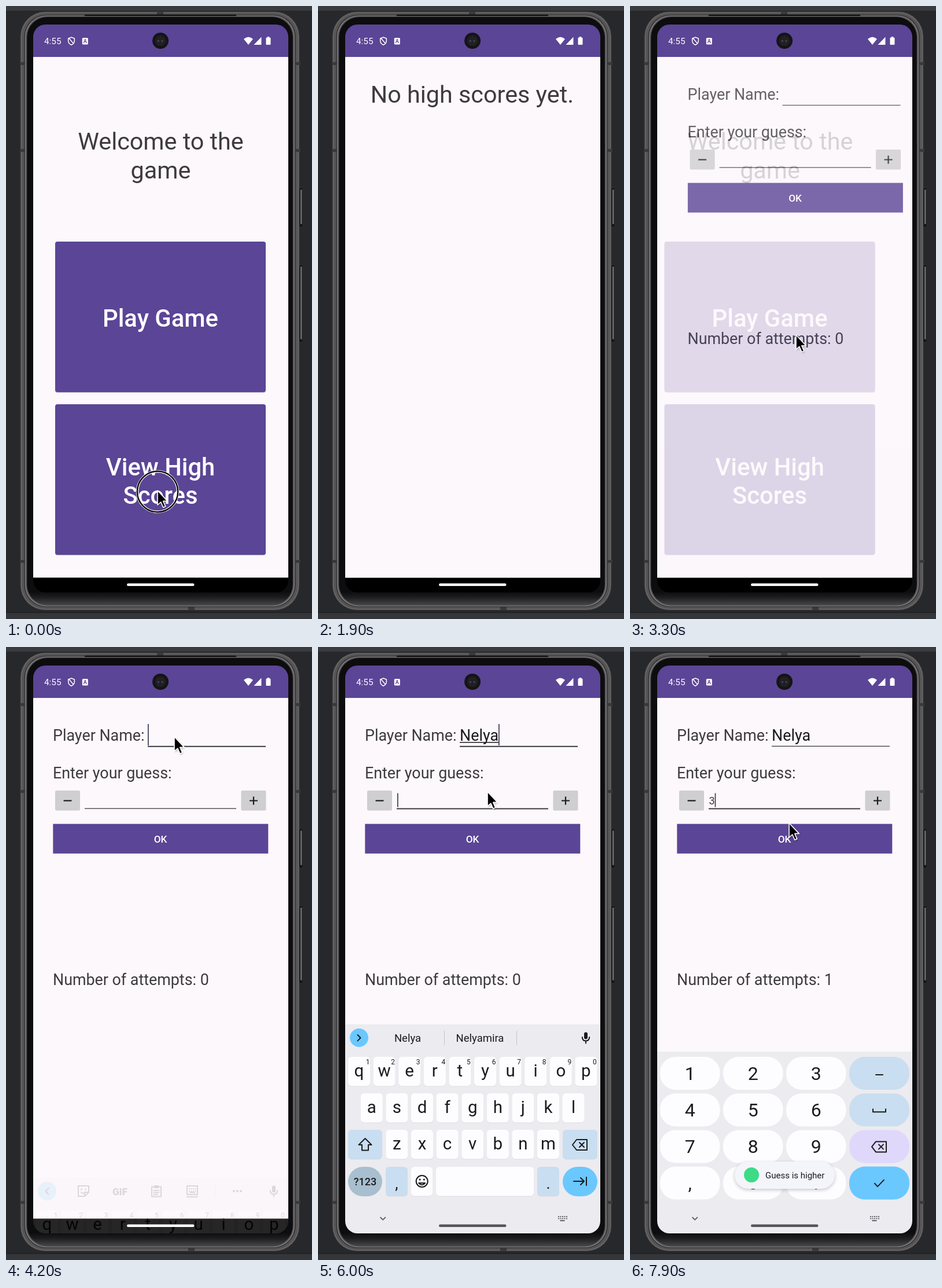
Animation of 529 by 1059 pixels, one loop 8 s. Source, as an HTML page:

```html
<!DOCTYPE html>
<html lang="en">
<head>
<meta charset="utf-8">
<title>Guessing game</title>
<style>
  html, body { margin: 0; width: 100%; height: 100%; overflow: hidden; background: #26282b; }
  svg { display: block; width: 529px; height: 1059px; font-family: Roboto, "Noto Sans", sans-serif; }
  .mid { text-anchor: middle; }
  .ink { fill: #3d3a40; }
  .key { fill: #1b1b1e; }
  .bold { font-weight: 500; }
  .line { fill: none; stroke: #1b1b1e; stroke-width: 2; stroke-linecap: round; stroke-linejoin: round; }
</style>
</head>
<body>
<svg id="stage" viewBox="0 0 529 1059"></svg>
<script>
const LOOP = 8000, STEP = 100;
const PURPLE = '#5b4596', PAPER = '#fdf8fc', SKY = '#6ac8ff', PALE = '#c9def0', CARET = '#3f3b55';
const TITLE = 41.3, LABEL = 26.85;
const NAME = 'Nelya', LONG_NAME = 'Nelyamira';

const rect = (x, y, w, h, fill, r = 0, extra = '') =>
  `<rect x="${x}" y="${y}" width="${w}" height="${h}" rx="${r}" fill="${fill}" ${extra}/>`;
const text = (x, y, size, str, cls = 'ink', extra = '') =>
  `<text x="${x}" y="${y}" font-size="${size}" class="${cls}" ${extra}>${str}</text>`;
const circle = (x, y, r, fill, extra = '') => `<circle cx="${x}" cy="${y}" r="${r}" fill="${fill}" ${extra}/>`;
const path = (d, extra = 'class="line"') => `<path d="${d}" ${extra}/>`;
const group = (id, body, extra = '') => `<g id="${id}" ${extra}>${body}</g>`;
const at = (x, y, body) => `<g transform="translate(${x} ${y})">${body}</g>`;

function phone() {
  const notch = '#39383a';
  const sides = [97, 247, 957].map(y => rect(24, y, 8, 5, notch) + rect(501, y, 8, 5, notch)).join('');
  const button = (y, h) => rect(507, y, 5, h, '#111214', 1) + rect(509, y + 2, 2.5, h - 6, '#6f6f71', 1);
  // Nested shells from the outer edge inwards
  const shell = (inset, fill, r) => rect(25 + inset, 10 + inset * .8, 482 - inset * 2, 1033.5 - inset * 1.6, fill, r);
  return rect(0, 0, 529, 1059, '#26282b') + rect(0, 0, 529, 8, '#393b3e') + rect(0, 1047, 529, 12, '#34363a') +
    rect(0, 1047, 529, 1.5, '#1d1e20') +
    button(315, 66) + button(448, 132) +
    shell(-.5, '#3c3b3d', 43) + shell(.7, '#6d6b6c', 42) + shell(2.2, '#565455', 41) + sides +
    rect(261, 9, 11, 6, notch) + rect(315, 1038, 11, 6, notch) +
    shell(6.5, '#2b2a2c', 38) + shell(7.8, '#777576', 37) + shell(9.8, '#4a484a', 36) + shell(11.3, 'url(#bezel)', 35) +
    path('M137 16H397', 'stroke="#0d0d0e" stroke-width="2.5" stroke-linecap="round"');
}

function statusBar() {
  const white = 'fill="#fff"';
  return rect(47, 32, 441, 56, PURPLE) +
    text(66, 66, 15.3, '4:55', '', white) +
    path('M113 54L118.3 56V60.5Q118 65 113 67.3Q108 65 107.7 60.5V56ZM109 56L116.5 64.5',
      'fill="none" stroke="#fff" stroke-width="1.5"') +
    rect(131.8, 55, 10, 11.5, '#fff', 1.5) +
    text(136.8, 64, 9, 'A', 'mid', `fill="${PURPLE}" font-weight="700"`) +
    path('M411 57Q419 50 427 57L419 67Z', white) + path('M428.5 67H441.5V53.5Z', white) +
    rect(449.5, 54.5, 8, 12.5, '#fff', 1.3) + rect(451.8, 53, 3.4, 2, '#fff') +
    circle(267, 60, 14, '#151416') + circle(267, 60, 9, '#222024') +
    circle(263.5, 60.5, 1.3, '#55506a') + circle(270, 60.5, 1.3, '#55506a');
}

const page = (id, body) => group(id, rect(-60, 88, 660, 899.5, PAPER) + body);

function homePage() {
  const card = (id, y) => rect(85, y + 1, 364, 260, '#2b2146', 4, 'opacity=".35"') + rect(85, y, 364, 260, PURPLE, 4) +
    rect(85, y, 364, 260, '#fff', 4, `id="${id}" opacity="0"`);
  const label = (y, str) => text(267, y, 41.7, str, 'mid bold', 'fill="#fff"');
  return page('home', text(267.5, 248, TITLE, 'Welcome to the', 'ink mid') + text(267.5, 297.5, TITLE, 'game', 'ink mid') +
    card('playGlow', 407) + card('scoresGlow', 688) +
    label(554, 'Play Game') + label(811, 'View High') + label(860, 'Scores'));
}

function gamePage() {
  const button = (x, sign) => rect(x, 248, 43, 34.5, '#cfced0', 2) +
    path(`M${x + 14.5} 265.5h14${sign}`, 'stroke="#1b1b1e" stroke-width="2.2"');
  return page('game', text(81, 161.5, LABEL, 'Player Name:') + text(81, 226.5, LABEL, 'Enter your guess:') +
    rect(245, 170.8, 204, 1, '#3d3a45', 0, 'id="nameLine"') +
    text(245, 161.5, LABEL, '', 'key', 'id="name"') + rect(245, 164, 0, 1.5, '#1b1b1e', 0, 'id="compose"') +
    rect(245, 133, 1.7, 37, CARET, 0, 'id="nameCaret"') +
    button(85, '') + button(406.5, 'm-7 -7v14') +
    rect(136, 278.4, 262, 1, '#3d3a45', 0, 'id="guessLine"') +
    text(136.5, 271.5, 18, '', 'ink', 'id="guess"') + rect(137, 252.5, 1.7, 24, CARET, 0, 'id="guessCaret"') +
    rect(81.3, 305.6, 372, 51.2, PURPLE) + text(267, 338, 17.2, 'OK', 'mid bold', 'fill="#fff"') +
    text(81, 583.5, LABEL, '', 'ink', 'id="tries"'));
}

const mic = at(463, 675, rect(-3, -9.5, 6, 12, '#1b1b1e', 3) + path('M-6.2 -1Q-6 5.4 0 5.4Q6 5.4 6.2 -1M0 6V9.5'));
const erase = path('M-13 0L-6 -9H12V9H-6ZM-1 -4L7 4M7 -4L-1 4');
const more = dir => circle(71, 675, 16, SKY) + path(`M${71 - 2.5 * dir} 670l${5 * dir} 5.2l${-5 * dir} 5.2`);

function toolbar() {
  const dots = [-6, 0, 6].map(x => circle(400 + x, 675, 2, '#1b1b1e')).join('');
  let keys = '';
  for (let i = 0; i < 8; i++) keys += rect(-6 + i % 4 * 3.5, -5 + (i >> 2) * 4, 2, 2, '#1b1b1e');
  return more(-1) +
    at(134, 675, path('M9 2V-9H-9V9H2L9 2H2V9M-4 2Q-1 5 2 3') + circle(-3.5, -3, 1.4, '#1b1b1e') + circle(3.5, -3, 1.4, '#1b1b1e')) +
    text(197, 681.5, 17, 'GIF', 'key mid', 'font-weight="800"') +
    at(260, 675, path('M-8 -7.5H8V9.5H-8ZM-4.5 -1H4.5M-4.5 2.5H4.5M-4.5 6H2') + rect(-4, -10, 8, 5, '#1b1b1e', 1)) +
    at(322, 675, path('M-9 -9H9V6H-9ZM-4 2.5H4M-9 10H9') + keys) +
    rect(361, 665, 1, 21, '#c4c3c9') + dots;
}

function keyboard() {
  const cap = (x, y, w, fill = '#fdfcff', r = 6, h = 50.5) => rect(x, y + 1, w, h, '#dddce2', r) + rect(x, y, w, h, fill, r);
  const row = (str, x0, y) => [...str].map((c, i) => {
    const x = x0 + i * 43.6;
    return cap(x - 19, y, 38) + text(x, y + 33.5, 29.5, c, 'key mid');
  }).join('');
  const hints = [...'1234567890'].map((c, i) => text(86 + i * 43.6, 721, 12, c, 'key mid')).join('');
  const suggestions = text(155, 682, 18.5, '', 'key mid', 'id="word1"') + text(280, 682, 18.5, '', 'key mid', 'id="word2"') +
    rect(218, 663, 1, 25, '#c4c3c9') + rect(343, 663, 1, 25, '#c4c3c9') + more(1);
  return group('letters', rect(47, 652, 441, 370, '#ecebf0') +
    group('tools', toolbar()) + group('suggest', suggestions) + mic +
    row('qwertyuiop', 71, 708) + hints + row('asdfghjkl', 92.8, 771) + row('zxcvbnm', 136.4, 834) +
    cap(52, 834, 59, PALE) + cap(423, 834, 60, PALE) +
    at(81.5, 860, path('M0 -11L11 0H5.5V9.5H-5.5V0H-11Z')) + at(453, 860, erase) +
    rect(52, 898, 59, 51, '#a8bfcf', 25.5) + text(81.5, 929.5, 18, '?123', 'key mid bold') +
    cap(117, 898, 38, PALE) + text(136, 936, 27, ',', 'key mid') +
    cap(161, 898, 37) + at(179.7, 923, path('M-5.5 3Q0 9.5 5.5 3Z') + circle(0, 0, 10, 'none', 'class="line"') +
      circle(-3.6, -3, 1.6, '#1b1b1e') + circle(3.6, -3, 1.6, '#1b1b1e')) +
    cap(204, 898, 169) + cap(379, 898, 38, PALE) + text(398, 936, 27, '.', 'key mid') +
    rect(423, 898, 60, 51, SKY, 25.5) + at(453, 923, path('M-11 0H7M1 -6L7 0L1 6M11 -7V7')) + footer);
}

function numberPad() {
  const rows = ['123', '456', '789', ',0.'];
  const fills = [PALE, PALE, '#e0d8fb', SKY];
  const icons = [path('M-6 2H6'), path('M-11 -2V3H11V-2'), erase, path('M-8 0L-3 5.5L8 -6')];
  let out = rect(47, 699, 441, 320, '#ecebf0');
  rows.forEach((row, j) => {
    const y = 708 + j * 63.2;
    [...row].forEach((c, i) => {
      out += rect(52 + i * 109, y, 103.5, 57, '#fdfcff', 27) + text(103.7 + i * 109, y + 39.5, 32, c, 'key mid');
    });
    out += rect(379, y, 104, 57, fills[j], 27) + at(431, y + 29, icons[j]);
  });
  return group('digits', out + footer);
}

let dotsKeys = '';
for (let i = 0; i < 10; i++) dotsKeys += rect(415 + i % 5 * 3.5, 983 + (i > 4) * 3.4, 2, 2, '#65646a');
const footer = path('M107.5 985l4.7 4.5l4.7 -4.5', 'fill="none" stroke="#65646a" stroke-width="1.8"') +
  dotsKeys + rect(418.5, 990, 8, 2, '#65646a');

const toast = () => group('toast',
  rect(181, 891, 173, 47, '#000', 23.5, 'opacity=".22" filter="url(#soft)"') + rect(181, 889, 173, 47, '#f3f5fb', 23.5) +
  circle(210, 912, 13, '#3ddb85') + text(234, 918, 15, 'Guess is higher', 'key'));

function pointer() {
  const arrow = 'M0 0V25L5.7 20L9.8 29.3L13.8 27.6L9.8 18.4H17.3Z';
  return group('ring', circle(0, 0, 35, 'none', 'stroke="#fff" stroke-width="4.5"') +
      circle(0, 0, 35.2, 'none', 'stroke="#09080b" stroke-width="2.4"')) +
    group('cursor', at(1, 2, path(arrow, 'opacity=".3" filter="url(#blur)"')) +
      path(arrow, 'fill="#000" stroke="#fff" stroke-width="1.6" stroke-linejoin="round"'));
}

stage.innerHTML = `<defs>
  <linearGradient id="bezel" gradientUnits="userSpaceOnUse" x1="0" y1="1012" x2="0" y2="1036">
    <stop offset="0" stop-color="#0d0c0e"/><stop offset=".4" stop-color="#1d1c1e"/><stop offset="1" stop-color="#4a494b"/></linearGradient>
  <filter id="soft"><feGaussianBlur stdDeviation="3"/></filter>
  <filter id="blur"><feGaussianBlur stdDeviation="1.5"/></filter>
  <clipPath id="screen">${rect(47, 32, 441, 981, '#000', 21)}</clipPath></defs>` +
  phone() + `<g clip-path="url(#screen)">` + rect(47, 32, 441, 981, '#000') +
  homePage() + page('scores', text(266.5, 167, TITLE, 'No high scores yet.', 'ink mid')) + gamePage() +
  statusBar() + keyboard() + numberPad() + rect(209, 997.5, 116.5, 4.5, '#fff', 2.2, 'id="pill"') +
  toast() + '</g>' + pointer();

const el = id => document.getElementById(id);
const set = (id, attrs) => { for (const k in attrs) el(id).setAttribute(k, attrs[k]); };
const show = (id, on) => set(id, { visibility: on ? 'visible' : 'hidden' });
const write = (id, str) => { el(id).textContent = str; };
const ramp = (t, a, b) => Math.min(1, Math.max(0, (t - a) / (b - a)));
const within = (t, spans) => spans.some(([a, b]) => t >= a && t < b);
const smooth = p => p * p * (3 - 2 * p);

// Rows are [time, ...values]
function track(t, rows, ease = p => p) {
  const i = rows.findIndex(r => r[0] > t);
  if (i < 0) return rows[rows.length - 1].slice(1);
  if (i === 0) return rows[0].slice(1);
  const [a, b] = [rows[i - 1], rows[i]], p = ease(ramp(t, a[0], b[0]));
  return a.slice(1).map((v, k) => v + (b[k + 1] - v) * p);
}

const mouse = [[0, 262, 837], [2400, 262, 837], [2900, 287, 574], [3000, 287, 570], [3400, 287, 568], [3900, 290, 160],
  [4200, 291, 155], [4400, 294, 144], [5500, 294, 146], [5800, 293, 250], [6900, 293, 250], [7400, 275, 304]];
const mouseOn = [[0, 700], [2400, 4700], [5500, 6800], [7000, LOOP]];
const clicks = [[0, 100], [3100, 3300], [3900, 4100], [5800, 5900], [7400, 7600]];
const typed = [4700, 4800, 5000, 5100, 5300];
const slide = [[4100, 340, 0], [4200, 265, .15], [4300, 60, .8], [4400, 0, 1]];
const moves = [['home', 'scores', 100, 1], ['scores', 'home', 1900, -1], ['home', 'game', 3200, 1]];

function drawPages(t) {
  const [from, to, start, dir] = moves.filter(m => t >= m[2]).pop() || ['game', 'home', -1000, 1];
  const p = ramp(t, start, start + 400), e = 1 - (1 - p) ** 3, fade = ramp(p, .05, .3);
  for (const id of ['home', 'scores', 'game']) show(id, id === to || (id === from && p < 1));
  // The later page lies on top, so going back fades it out.
  const top = dir > 0 ? to : from, under = dir > 0 ? from : to, out = dir > 0 ? e : 1 - e;
  set(top, { opacity: dir > 0 ? fade : 1 - fade, transform: `translate(${44 * (1 - out)} 0)` });
  set(under, { opacity: 1, transform: `translate(${-44 * out} 0)` });
  set('scoresGlow', { opacity: within(t, [[100, 300]]) ? .14 : 0 });
  set('playGlow', { opacity: within(t, [[3200, 3500]]) ? .14 : 0 });
}

function drawForm(t) {
  const count = typed.filter(s => t >= s).length, guess = t >= 6900 ? '3' : '';
  write('name', NAME.slice(0, count));
  write('guess', guess);
  write('tries', `Number of attempts: ${t >= 7600 ? 1 : 0}`);
  const width = el('name').getComputedTextLength();
  set('compose', { width: t < 6100 ? width : 0 });
  set('nameCaret', { x: Math.round(245 + width) });
  set('guessCaret', { x: 137 + (guess ? el('guess').getComputedTextLength() - .5 : 0) });
  show('nameCaret', within(t, [[4100, 4600], [4700, 5800], [5900, 6100]]));
  show('guessCaret', within(t, [[5900, 6400], [6900, 7400], [7800, LOOP]]));
  set('nameLine', { height: within(t, [[4100, 6100]]) ? 2 : 1.3 });
  set('guessLine', { height: t >= 5900 ? 2 : 1.3 });

  const [dy, alpha] = track(t, slide);
  set('letters', { transform: `translate(0 ${dy})`, opacity: alpha });
  show('letters', within(t, [[4200, 6200]]));
  show('digits', t >= 6200);
  const words = count > 0;
  set('tools', { display: words ? 'none' : 'inline' });
  set('suggest', { display: words ? 'inline' : 'none' });
  write('word1', NAME.slice(0, count));
  write('word2', count > 2 ? LONG_NAME : '');
  set('pill', { fill: t < 4400 ? '#fff' : t < 4600 ? '#e2e1e6' : '#55565a' });
  const rise = ramp(t, 7500, 7800);
  set('toast', { opacity: rise, transform: `translate(0 ${12 * (1 - rise)})` });
}

function draw(t) {
  drawPages(t);
  if (t >= 3200) drawForm(t);
  else {
    for (const id of ['letters', 'digits', 'nameCaret', 'guessCaret']) show(id, false);
    set('toast', { opacity: 0 });
    set('pill', { fill: '#fff' });
  }
  const [x, y] = track(t, mouse, smooth);
  set('cursor', { transform: `translate(${x} ${y})` });
  set('ring', { transform: `translate(${x} ${y + 2})` });
  show('cursor', within(t, mouseOn));
  show('ring', within(t, clicks));
}

const start = performance.now();
let last = -1;
function tick() {
  const t = Math.floor((performance.now() - start) % LOOP / STEP) * STEP;
  if (t !== last) draw(last = t);
  requestAnimationFrame(tick);
}
tick();
</script>
</body>
</html>
```
